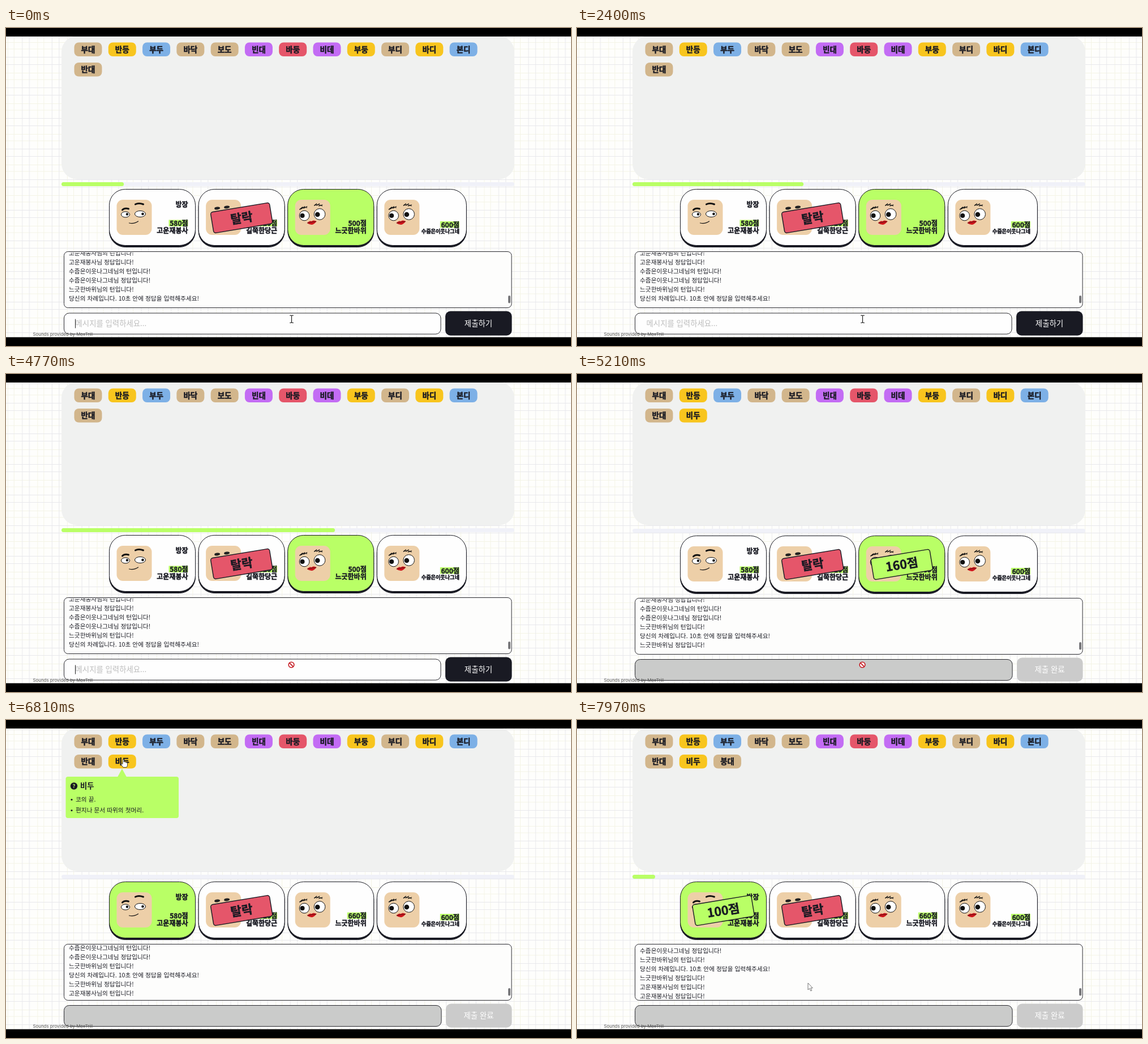
Animation of 998x561 px, one loop 8 s. Source, as an HTML page:

```html
<!DOCTYPE html>
<html lang="ko">
<head>
<meta charset="utf-8">
<style>
html, body { margin: 0; height: 100%; overflow: hidden; background: #fff; }
svg { display: block; width: 100%; height: 100%; }
text { font-family: 'Noto Sans CJK KR', 'Noto Sans KR', 'Noto Sans CJK', sans-serif; fill: #191a23; white-space: pre; }
.heavy { font-weight: 900; stroke: #191a23; stroke-width: .45px; }
.mid { text-anchor: middle; }
.end { text-anchor: end; }
.log { font-size: 10.7px; }
.field { font-size: 13.4px; font-weight: 300; }
</style>
</head>
<body>
<svg viewBox="0 0 998 561">
  <defs>
    <pattern id="grid" x="8.8" y="31" width="52.6" height="54" patternUnits="userSpaceOnUse">
      <path d="M5.5 0V54M47 0V54M0 6H52.6M0 48.5H52.6" stroke="#f4f4e6"/>
      <path d="M20 0V54M32.5 0V54M0 20.5H52.6M0 33.5H52.6" stroke="#e8e8ec"/>
    </pattern>
    <clipPath id="logClip"><rect x="103" y="396" width="780" height="97"/></clipPath>
  </defs>
  <rect width="998" height="561" fill="#fefefc"/>
  <rect width="998" height="561" fill="url(#grid)"/>
  <rect x="98" y="14" width="800" height="253" rx="28" fill="#f0f1f0"/>
  <g id="scene"></g>
  <text x="47.5" y="543" style="font:7.9px Inter,sans-serif;fill:#555">Sounds provided by MoxTrill</text>
  <path d="M0 0H998V15H0zM0 545.5H998V561H0z"/>
  <g id="pointer"></g>
</svg>
<script>
const LIME = '#b9ff66', INK = '#191a23', RED = '#e5566a', SKIN = '#edcfa8';
const TAN = '#d2b68c', GOLD = '#f8c51e', BLUE = '#7db0e6', VIOLET = '#c36cf4';
const LOOP = 8000;
// moments of the game, in ms
const ENTER = 4662, ACCEPT = 4900, RESET = 5010, TURN = 6610, START = 7140, STOP = 7640, ACCEPT2 = 7840;
const HOST = '고운재봉사', OUT = '길쭉한당근', ME = '느긋한바위', GUEST = '수줍은이웃나그네';

const words = [
  ['부대', TAN], ['반등', GOLD], ['부두', BLUE], ['바닥', TAN], ['보도', TAN], ['빈대', VIOLET],
  ['바둥', RED], ['비데', VIOLET], ['부둥', GOLD], ['부디', TAN], ['바디', GOLD], ['본디', BLUE],
  ['반대', TAN], ['비두', GOLD, ACCEPT], ['붕대', TAN, ACCEPT2]
];
const turn = name => name + '님의 턴입니다!';
const right = name => name + '님 정답입니다!';
const log = [turn(HOST), right(HOST), turn(GUEST), right(GUEST), turn(ME),
  '당신의 차례입니다. 10초 안에 정답을 입력해주세요!', right(ME), turn(HOST), right(HOST)];
const typing = [[3480, 'ㅂ'], [3640, '비'], [3980, '빋'], [4160, '비두']];

const clamp = p => Math.max(0, Math.min(1, p));
const ease = p => (p = clamp(p), p * p * (3 - 2 * p));
const rect = (x, y, w, h, r, fill, more = '') =>
  `<rect x="${x}" y="${y}" width="${w}" height="${h}" rx="${r}" fill="${fill}" ${more}/>`;
const text = (x, y, s, cls = '', more = '') => `<text x="${x}" y="${y}" class="${cls}" ${more}>${s}</text>`;
const size = n => `font-size="${n}"`;
const line = (d, w = 1, more = '') =>
  `<path d="${d}" fill="none" stroke="#111" stroke-width="${w}" stroke-linecap="round" ${more}/>`;
const oval = (x, y, rx, ry, fill, more = '') =>
  `<ellipse cx="${x}" cy="${y}" rx="${rx}" ry="${ry}" fill="${fill}" ${more}/>`;
const eye = (x, y, rx, ry, px, py, pr) =>
  oval(x, y, rx, ry, '#fff', 'stroke="#111"') + oval(px, py, pr, pr, '#111');

// faces, relative to the avatar's corner
const smirk = line('M10 18Q14 14 21 16', 3) + line('M33 8Q39 5 47 8', 3)
  + eye(15.5, 26, 7.5, 5, 18.5, 25.5, 2.2) + eye(41.5, 25, 9.5, 5.5, 46, 25, 2.3)
  + line('M22 41Q31 43 38 38', 1.2);
const lips = line('M8 17L13 13M11 16L17 12M15 15L21 12M34 10L38 7M38 10L43 7M42 11L48 9', 1.3)
  + line('M9 17Q14 12 21 14M34 10Q41 7 48 11')
  + eye(16.3, 28, 8.8, 8.8, 12.8, 28, 4) + eye(43.3, 25.5, 9.8, 9.8, 39.5, 26, 4.3)
  + '<path d="M21 41Q26 36 29 38Q32 35 38 38Q33 44 29 44Q25 44 21 41z" fill="#cf151b"/>' + line('M22 41Q30 39 37 38.5', .6);
const glum = oval(20, 15, 5, 2.4, '#222', 'transform="rotate(-8 20 15)"')
  + oval(37, 13, 5, 2.4, '#222', 'transform="rotate(-8 37 13)"');

const tag = ([word, fill], i) => {
  const x = 120.5 + i % 12 * 60.28, y = i < 12 ? 25.5 : 61;
  return rect(x, y, 49, 24.5, 8, fill) + text(x + 24.5, y + 17.4, word, 'heavy mid', size(13.5));
};

const stamp = (label, fill) => `<g transform="translate(76 50.5) rotate(-9.4)">`
  + rect(-52.7, -18.7, 105.4, 37.4, 4, fill, `stroke="${INK}" stroke-width="1.4"`)
  + text(0, 8, label, 'heavy mid', size(21.5)) + '</g>';

function card(i, { name, score, face, active, badge, host }) {
  const small = name.length > 6, low = small ? 2.5 : 0, edge = small ? 145.5 : 139;
  const width = small ? 158 : 152;
  return `<g transform="translate(${182.5 + i * 157.6} 284.5)">`
    + rect(0, 3, width, 99, 28, INK, `stroke="${INK}"`)
    + rect(0, 0, width, 99, 28, active ? LIME : '#fefefe', `stroke="${INK}"`)
    + `<g transform="translate(13 18.5)">${rect(0, 0, 62, 62, 11, SKIN)}${face}</g>`
    + (host ? text(edge, 31, '방장', 'heavy end', size(12)) : '')
    + rect(edge - 34, 54 + low, 34, 11.5, 0, LIME)
    + text(edge, 64.5 + low, score + '점', 'heavy end', size(12))
    + text(edge, 77.2, name, 'heavy end', size(small ? 9.1 : 12))
    + (badge || '') + '</g>';
}

const cards = t => [
  { name: HOST, score: t < ACCEPT2 ? 580 : 680, face: smirk, host: true, active: t >= TURN,
    badge: t >= ACCEPT2 && stamp('100점', LIME) },
  { name: OUT, score: 320, face: glum, badge: stamp('탈락', RED) },
  { name: ME, score: t < ACCEPT ? 500 : 660, face: lips, active: t < TURN,
    badge: t >= ACCEPT && t < TURN && stamp('160점', LIME) },
  { name: GUEST, score: 600, face: lips }
].map((c, i) => card(i, c)).join('');

function timer(t) {
  const w = t < RESET ? 110 + .08 * Math.min(t, ENTER) : .08 * (Math.min(t, STOP) - START);
  return rect(98, 272, 800, 7, 3.5, '#f0f1f8') + (w > 0 ? rect(98, 272, w.toFixed(1), 7, Math.min(3.5, w / 2), LIME) : '');
}

function chat(t) {
  const times = [ACCEPT, TURN, ACCEPT2];
  const scroll = times.reduce((s, at) => s + 16 * ease((t - at) / 300), 0);
  const shown = 6 + times.filter(at => t >= at).length;
  return rect(102.5, 394.5, 790.5, 99, 7, '#fdfdfc', 'stroke="#2a2a30"')
    + '<g clip-path="url(#logClip)">'
    + log.slice(0, shown).map((s, i) => text(111, (400.7 + i * 16 - scroll).toFixed(2), s, 'log')).join('')
    + '</g>' + rect(887, 472, 4, 13.5, 2, '#77777a');
}

function form(t) {
  if (t >= ACCEPT)
    return rect(102.5, 502.5, 666.5, 37, 9, '#cacbca', 'stroke="#2a2a30"')
      + rect(777, 499.5, 116.5, 42, 9, '#cbcbcb')
      + text(835, 525, '제출 완료', 'field mid', 'style="fill:#fff"');
  const typed = t < ENTER ? typing.filter(k => t >= k[0]).pop() : null;
  const width = typed ? typed[1].length * 12.3 : 0;
  const blink = typed || t >= ENTER || (t + 400) % 1060 < 530;
  return rect(102.5, 503, 665.5, 37, 9, '#fefefe', 'stroke="#2a2a30"')
    + rect(776, 499.5, 117.5, 43, 9, INK)
    + text(834.5, 525.5, '제출하기', 'field mid', 'style="fill:#fff"')
    + (typed
      ? text(122.5, 526, typed[1], 'field') + rect(122.5, 529, width, 1, 0, '#444')
      : text(122.5, 526, '메시지를 입력하세요...', 'field', 'style="fill:#bdbdbd"'))
    + (blink ? rect(122 + width, 513.5, 1, 16, 0, '#222') : '');
}

const tooltip = () => rect(105.5, 100, 199.5, 73, 4, LIME)
  + `<path d="M197 100.5L205 86L213 100.5z" fill="${LIME}"/>`
  + oval(120, 116.5, 6.2, 6.2, INK)
  + text(120, 120, '?', 'mid', `font-size="9.5" font-weight="900" style="fill:${LIME}"`)
  + text(131, 121.3, '비두', '', 'font-size="13.3" font-weight="700"')
  + oval(116, 140.5, 1.6, 1.6, INK) + text(123, 143.7, '코의 끝.', 'log')
  + oval(116, 159.5, 1.6, 1.6, INK) + text(123, 162.7, '편지나 문서 따위의 첫머리.', 'log');

const shapes = {
  beam: line('M-2.5 -6H-.5L.5 -5L1.5 -6H3.5M.5 -5V6M-2.5 7H-.5L.5 6L1.5 7H3.5', 1.1),
  forbid: '<g fill="#fff" stroke="#c3141c" stroke-width="1.6"><circle r="4.8"/><path d="M-3.4 -3.4L3.4 3.4"/></g>',
  arrow: '<path d="M0 0V12L2.8 9.5L4.8 14L6.8 13.1L4.8 8.8H8.3z" fill="#fff" stroke="#666" stroke-width=".9"/>',
  hand: '<path d="M-1 1Q0 -1 1.2 1V5Q3 4 3.7 5.3Q5.3 4.8 5.8 6.2Q7.5 6 7.5 8V11Q7 13 6 14.5H0Q-2 12 -4 9Q-3.5 7 -1 9z" fill="#fff" stroke="#333" stroke-width=".9"/>'
};

function pointer(t) {
  const go = ease((t - 5710) / 400), back = ease((t - 7130) / 570);
  const x = 504 - 297 * go + 201 * back, y = 513 - 444 * go + 395 * back;
  const kind = t < ENTER ? 'beam' : t < ACCEPT || y > 503 ? 'forbid' : y < 86 ? 'hand' : 'arrow';
  return `<g transform="translate(${x.toFixed(1)} ${y.toFixed(1)})">${shapes[kind]}</g>`;
}

const scene = t => words.map((w, i) => t >= (w[2] || 0) ? tag(w, i) : '').join('')
  + `<g transform="translate(0 ${t < ACCEPT ? 0 : 1})">${timer(t)}${cards(t)}${chat(t)}${form(t)}</g>`
  + (t >= 6310 && t < 7170 ? tooltip() : '');

const last = {};
function put(id, markup) {
  if (last[id] !== markup) document.getElementById(id).innerHTML = last[id] = markup;
}
const origin = performance.now();
function draw() {
  const t = (performance.now() - origin) % LOOP;
  put('scene', scene(t));
  put('pointer', pointer(t));
  requestAnimationFrame(draw);
}
draw();
</script>
</body>
</html>
```
